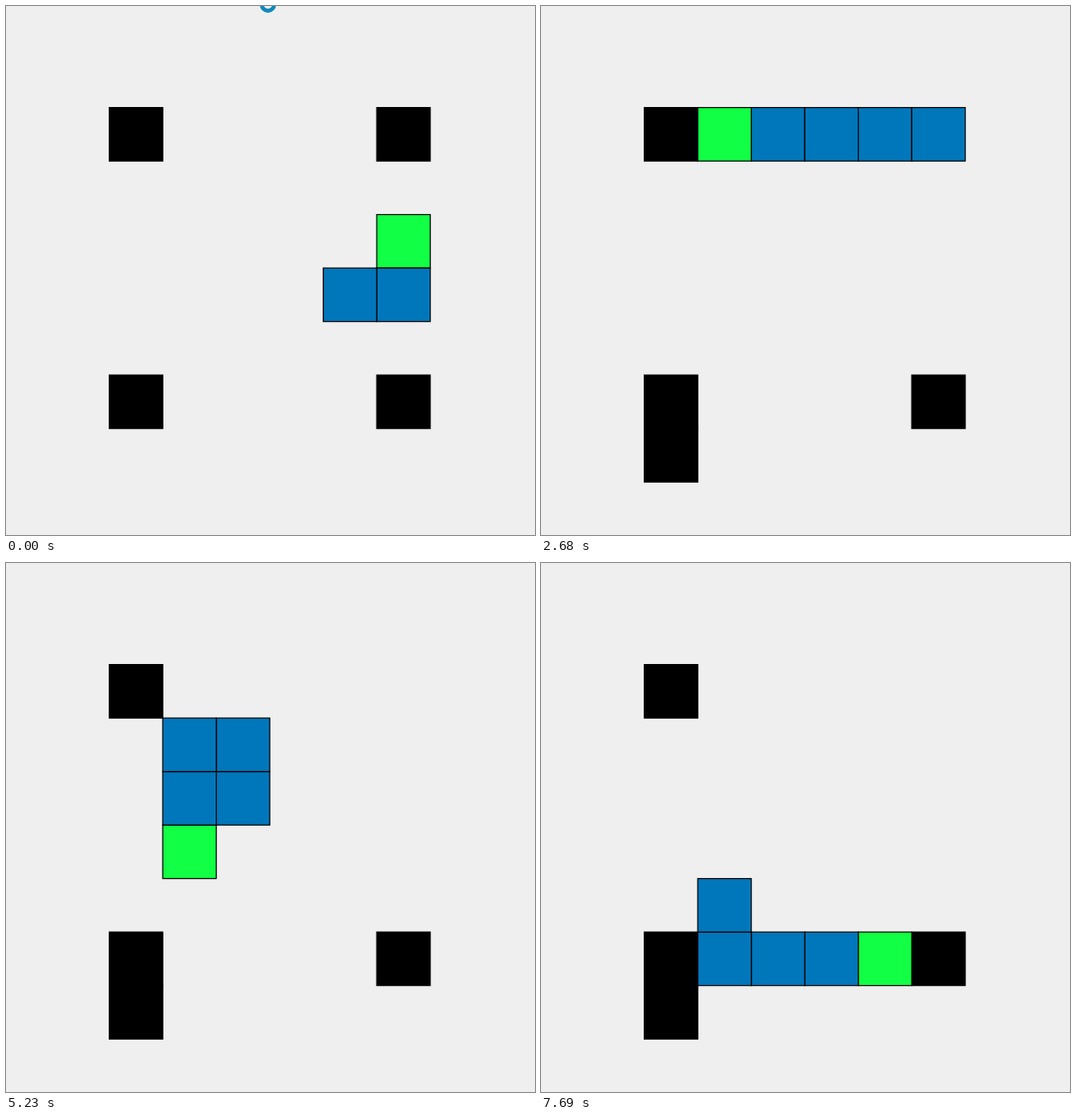
An HTML page that plays this animation: 618x618 px, repeating every 8 s.

```html
<!DOCTYPE html>
<html lang="en">
<head>
<meta charset="utf-8">
<title>Snake</title>
<style>
  html, body { margin: 0; width: 100%; height: 100%; overflow: hidden; background: #efefef; }
  svg { display: block; width: 100%; height: 100%; }
</style>
</head>
<body>
<svg viewBox="0 0 618 618">
  <rect width="618" height="618" fill="#efefef"/>
  <g id="board" stroke="#000" stroke-width="1.25"></g>
  <circle id="ring" r="7.2" fill="none" stroke="#0e8abb" stroke-width="4.6"/>
</svg>
<script>
const LOOP = 8000, FPS = 15, DELAY = 10;
const FIRST_MOVE = 2.6, MOVE_EVERY = 7.46;   // in ticks of 1/15 s
const RING_BACK = 8;                         // tick when the pointer returns
const CELL = 62.5, LEFT = 120.625, TOP = 118.625;
const BLACK = '#000', BLUE = '#0077bb', GREEN = '#11ff44';
const DIRS = { U: [0, -1], D: [0, 1], L: [-1, 0], R: [1, 0] };
const MOVES = 'UULLLLDRDLDDDRRR';

const board = document.getElementById('board');
const ring = document.getElementById('ring');
const same = (a, b) => a[0] === b[0] && a[1] === b[1];

// Play the whole game once and keep the state after each move.
function playGame() {
  let snake = [[5, 2], [5, 3], [4, 3]];
  let food = [[0, 0], [5, 0], [0, 5], [5, 5]];
  const spawns = [[2, 0], [0, 6]];
  const states = [{ snake, food }];
  for (const move of MOVES) {
    const [dx, dy] = DIRS[move];
    const head = [snake[0][0] + dx, snake[0][1] + dy];
    const eats = food.some(f => same(f, head));
    snake = [head, ...(eats ? snake : snake.slice(0, -1))];
    if (eats) food = [...food.filter(f => !same(f, head)), spawns.shift()];
    states.push({ snake, food });
  }
  return states;
}

const states = playGame();
let shown = -1;

function cell([col, row], fill) {
  return `<rect x="${LEFT + col * CELL}" y="${TOP + row * CELL}" ` +
         `width="${CELL}" height="${CELL}" fill="${fill}"/>`;
}

function drawBoard(step) {
  if (step === shown) return;
  shown = step;
  const { snake, food } = states[step];
  board.innerHTML = food.map(f => cell(f, BLACK)).join('') +
    snake.map((s, i) => cell(s, i ? BLUE : GREEN)).join('');
}

// The pointer slips off the top edge, then sweeps back in and out to the right.
function ringAt(tick) {
  const u = tick - RING_BACK;
  return u < 0
    ? [306, -1.6 - 5 * tick]
    : [310 - 17 * u + 79 * u * u, 22 * u + 50 * u * u];
}

function draw(t) {
  const tick = Math.max(0, Math.floor((t - DELAY) * FPS / 1000));
  drawBoard(Math.max(0, Math.ceil((tick - FIRST_MOVE) / MOVE_EVERY)));
  const [x, y] = ringAt(tick);
  ring.setAttribute('cx', x);
  ring.setAttribute('cy', y);
}

const start = performance.now();
function loop() {
  draw((performance.now() - start) % LOOP);
  requestAnimationFrame(loop);
}
draw(0);
requestAnimationFrame(loop);
</script>
</body>
</html>
```
